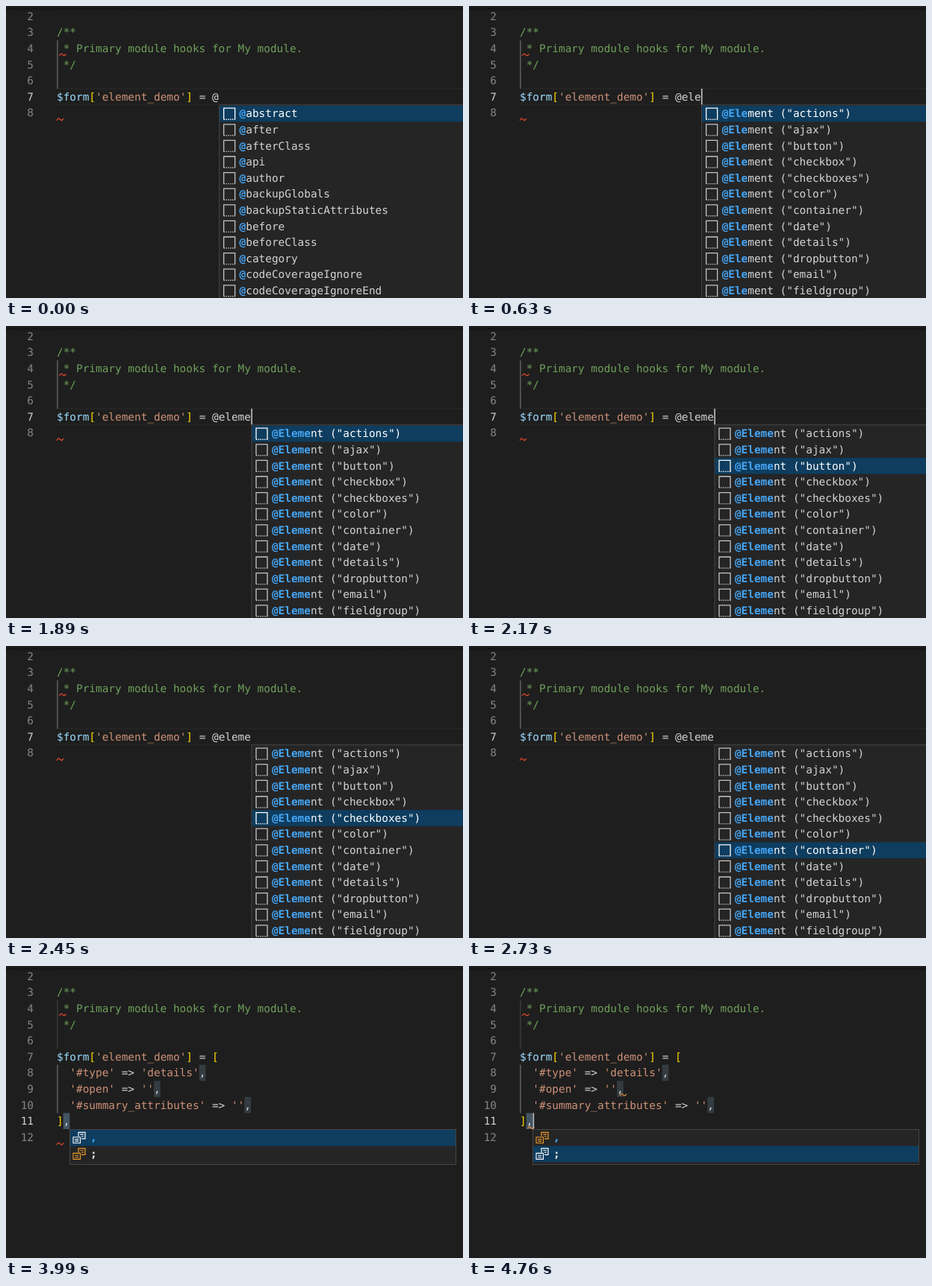
Write an HTML page that moves like this. It is 612 px wide and 392 px high and loops after 4.83 s.

```html
<!DOCTYPE html>
<html lang="en">
<head>
<meta charset="utf-8">
<title>Code completion</title>
<style>
  html, body { margin: 0; width: 100%; height: 100%; overflow: hidden; background: #1e1e1e; }
  svg { display: block; width: 612px; height: 392px; }
  text {
    font: 14.4px "DejaVu Sans Mono", "Liberation Mono", monospace;
    white-space: pre; text-rendering: geometricPrecision;
  }
</style>
</head>
<body>
<svg id="stage" viewBox="0 0 612 392"></svg>
<script>
const LOOP = 4830, CHAR = 14.4 * 0.602, LINE = 21.6, LEFT = 68;
const C = {
  fg: '#d4d4d4', comment: '#6fa05a', variable: '#9cdcfe', string: '#ce9178', bracket: '#ffd700',
  number: '#858585', active: '#d0d0d0', menu: '#252526', edge: '#454545', picked: '#0e3d5f',
  match: '#45a6f5', error: '#d8482f', warn: '#cf8a45', icon: '#ee9d28'
};
const TAGS = ['abstract', 'after', 'afterClass', 'api', 'author', 'backupGlobals',
  'backupStaticAttributes', 'before', 'beforeClass', 'category',
  'codeCoverageIgnore', 'codeCoverageIgnoreEnd'].map(s => '@' + s);
const ELEMENTS = ['actions', 'ajax', 'button', 'checkbox', 'checkboxes', 'color', 'container',
  'date', 'details', 'dropbutton', 'email', 'fieldgroup'].map(s => `@Element ("${s}")`);

// Each step changes some of the state from its time on.
const STEPS = [
  [0, { typed: '@', match: 1, at: 25, row: 0, caret: 0, done: 0, menu: 1, lint: 0 }],
  [420, { typed: '@e', caret: 1 }],
  [490, { match: 2, at: 26 }],
  [560, { typed: '@el', match: 3, at: 27 }],
  [630, { typed: '@ele', match: 4, at: 28 }],
  [700, { typed: '@elem', match: 5, at: 29 }],
  [770, { typed: '@eleme' }],
  [840, { match: 6, at: 30 }],
  [1330, { caret: 0 }],
  [1890, { caret: 1 }],
  [2030, { row: 1 }],
  [2170, { row: 2 }],
  [2310, { row: 3 }],
  [2380, { caret: 0 }],
  [2450, { row: 4 }],
  [2590, { row: 5 }],
  [2730, { row: 6 }],
  [2940, { row: 7, caret: 1 }],
  [3080, { row: 8 }],
  [3430, { done: 1, menu: 0, row: 0, caret: 0 }],
  [3500, { caret: 1 }],
  [3570, { menu: 1 }],
  [3990, { caret: 0 }],
  [4270, { lint: 1 }],
  [4480, { caret: 1 }],
  [4760, { row: 1 }]
];

const col = n => LEFT + n * CHAR;
const lineY = n => 111 + (n - 7) * LINE;
const esc = s => s.replace(/&/g, '&amp;').replace(/</g, '&lt;').replace(/>/g, '&gt;');
const rect = (x, y, w, h, fill, more = '') =>
  `<rect x="${x}" y="${y}" width="${w}" height="${h}" fill="${fill}" ${more}/>`;
const path = (d, color, width = 1.3, more = '') =>
  `<path d="${d}" fill="none" stroke="${color}" stroke-width="${width}" ${more}/>`;
const label = (x, y, parts, more = '') => `<text x="${x}" y="${y}" ${more}>` +
  parts.map(([s, color, bold]) =>
    `<tspan fill="${color}"${bold ? ' font-weight="bold"' : ''}>${esc(s)}</tspan>`).join('') + '</text>';
const code = (n, ...parts) => label(LEFT, lineY(n) + 15.7, parts);
const squiggle = (x, y, color) =>
  path(`M${x} ${y + 3}q2.2 -4.4 4.4 -1.4t4.4 -1`, color, 1.4);
const guide = (from, to, color) => rect(68.3, lineY(from), 1.2, (to - from) * LINE, color);
const caret = (n, c) => rect(col(c) + 0.2, lineY(n), 1.6, 21.2, '#c4c5c3');

function numbers(last, active) {
  let out = '';
  for (let n = 2; n <= last; n++)
    out += label(37, lineY(n) + 15.7, [[String(n), n === active ? C.active : C.number]], 'text-anchor="end"');
  return out;
}

function snippetIcon(x, y, color) {
  return path(`M${x} ${y + 15}V${y}h15v15`, color) +
    path(`M${x} ${y + 15}h15.6`, color, 1.4, 'stroke-dasharray="1.4 1.4"');
}

function enumIcon(x, y, color) {
  return path(`M${x + 7} ${y + 5.5}v-5.5h9v8.5h-5`, color, 1.2) +
    path(`M${x} ${y + 6.5}h9.5v8h-9.5zM${x + 2.3} ${y + 9.3}h5M${x + 2.3} ${y + 11.8}h5` +
      `M${x + 9.3} ${y + 2.8}h4.5M${x + 11} ${y + 5.4}h2.8`, color, 1.1);
}

function completions(s) {
  const x = col(s.at), items = s.match > 1 ? ELEMENTS : TAGS;
  let out = rect(x + 0.8, 132.8, 400, 300, C.menu, `stroke="${C.edge}"`);
  items.forEach((item, i) => {
    const y = 133.8 + i * LINE, on = i === s.row;
    if (on) out += rect(x + 1.3, y, 400, LINE, C.picked);
    out += snippetIcon(x + 6.9, y + 3.4, on ? '#ffffff' : '#c5c5c5') +
      label(x + 27.9, y + 15.5, [[item.slice(0, s.match), C.match, 1],
        [item.slice(s.match), on ? '#ffffff' : C.fg]]);
  });
  return out;
}

function endings(row) {
  let out = rect(85.5, 219.5, 517, 47, C.menu, `stroke="${C.edge}"`);
  [',', ';'].forEach((ch, i) => {
    const y = 220 + i * LINE, on = i === row;
    if (on) out += rect(86, y, 516, LINE, C.picked);
    out += enumIcon(90, y + 3.3, on ? '#ffffff' : C.icon) +
      label(113, y + 15.3, [[ch, i ? '#e8e8e8' : C.match, 1]]);
  });
  return out;
}

const assign = [['$form', C.variable], ['[', C.bracket], ["'element_demo'", C.string],
  [']', C.bracket], [' = ', C.fg]];

function editing(s) {
  return rect(LEFT, 110.5, 544, 1.2, '#292929') + rect(LEFT, 131.6, 544, 1.2, '#292929') +
    guide(4, 7, '#707070') + numbers(8, 7) +
    code(7, ...assign, [s.typed, C.fg]) +
    squiggle(68, lineY(8) + 18, C.error) +
    completions(s) + (s.caret ? caret(7, 24 + s.typed.length) : '');
}

function inserted(s) {
  const stop = (n, c, fill) => rect(col(c), lineY(n), CHAR, LINE, fill);
  const entry = (n, key, value) =>
    code(n, ["  '" + key + "'", C.string], [' => ', C.fg], ["'" + value + "'", C.string], [',', C.fg]);
  return guide(4, 7, '#404040') + guide(8, 11, '#707070') +
    stop(8, 22, '#343c41') + stop(9, 15, '#343c41') + stop(10, 29, '#343c41') + stop(11, 1, '#445462') +
    numbers(12, 11) +
    code(7, ...assign, ['[', C.bracket]) +
    entry(8, '#type', 'details') + entry(9, '#open', '') + entry(10, '#summary_attributes', '') +
    code(11, [']', C.bracket], [',', C.fg]) +
    (s.lint
      ? squiggle(202, lineY(9) + 17, C.warn) + squiggle(78.5, lineY(11) + 18, C.warn)
      : squiggle(68, lineY(12) + 18, C.error)) +
    (s.menu ? endings(s.row) : '') +
    (s.caret ? caret(11, 2) : '');
}

const base = rect(0, 0, 612, 392, '#1e1e1e') +
  '<defs><linearGradient id="shade" x2="0" y2="1"><stop stop-color="#121212"/>' +
  '<stop offset="1" stop-color="#1e1e1e"/></linearGradient></defs>' +
  rect(0, 2.5, 612, 4.5, 'url(#shade)') +
  code(3, ['/**', C.comment]) +
  code(4, [' * Primary module hooks for My module.', C.comment]) +
  code(5, [' */', C.comment]) +
  squiggle(71.5, lineY(4) + 17.5, C.error);

const stage = document.getElementById('stage');
const start = performance.now();
let shown = -1;

function draw(now) {
  const t = Math.max(0, now - start) % LOOP;
  const passed = STEPS.filter(([at]) => at <= t);
  if (passed.length !== shown) {
    shown = passed.length;
    const s = Object.assign({}, ...passed.map(p => p[1]));
    stage.innerHTML = base + (s.done ? inserted(s) : editing(s));
  }
  requestAnimationFrame(draw);
}
draw(start);
</script>
</body>
</html>
```
